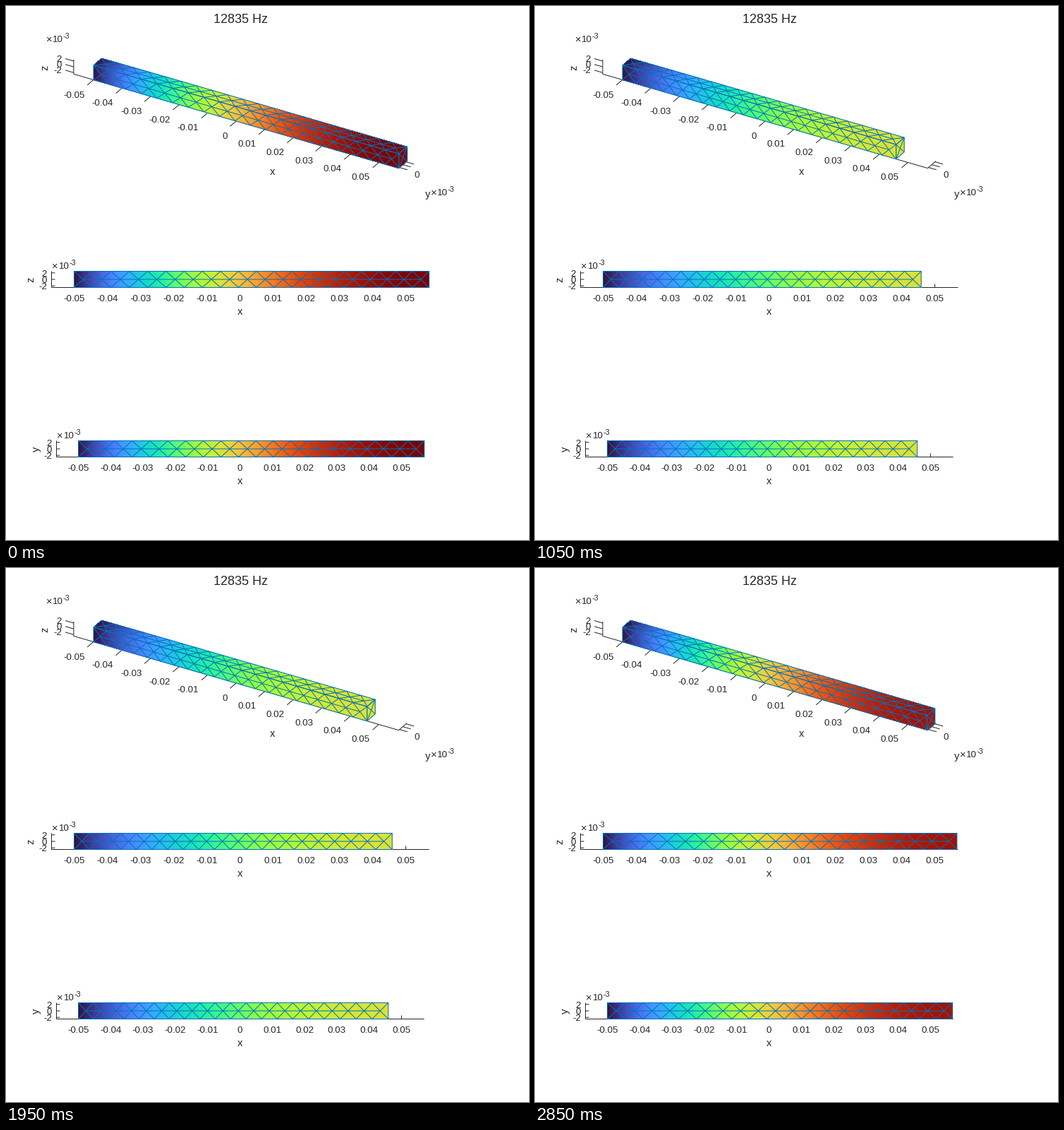
Write a matplotlib script that moves like this. It is 741 px wide and 756 px high and loops after 3 s.

```python
import numpy as np
import matplotlib.pyplot as plt
from matplotlib.animation import FuncAnimation
from matplotlib.collections import LineCollection, PolyCollection

W, H, DPI = 741, 756, 100
FRAMES, INTERVAL = 20, 150
PX = 72 / DPI                     # points per pixel
CELLS, SLICES = 20, 160
STRETCH = 0.0702                  # peak tip displacement / bar length
INK, EDGE = "#262626", "#0072BD"
TICK, LABEL, TITLE = 13.33, 14.67, 18

plt.rcParams["font.family"] = "Liberation Sans"
plt.rcParams["axes.unicode_minus"] = False

fig = plt.figure(figsize=(W / DPI, H / DPI), dpi=DPI, facecolor="white")
ax = fig.add_axes([0, 0, 1, 1])
# Whole coordinates are pixel centres, so straight lines need no snapping.
ax.set(xlim=(-0.5, W - 0.5), ylim=(H - 0.5, -0.5))
ax.axis("off")


def text(x, y, s, size=TICK, ha="center"):
    """Text whose digits are vertically centred on y."""
    ax.text(x - 0.5, y + 0.36 * size - 0.5, s, fontsize=size * PX, ha=ha,
            va="baseline", color=INK)


def side_label(x, y, s):
    ax.text(x - 0.5, y - 0.5, s, fontsize=LABEL * PX, ha="center",
            va="center", rotation=90, color=INK)


def exponent(x, y):
    text(x, y, "×", size=LABEL, ha="left")
    text(x + 9.5, y, "10", ha="left")
    text(x + 24.5, y - 4, "-3", size=10.7, ha="left")


def line(p, q):
    ax.plot([p[0], q[0]], [p[1], q[1]], color=INK, lw=PX, zorder=1,
            solid_capstyle="butt", snap=False)


def tick_name(k):
    return "0" if k == 0 else f"{k / 100:.2f}"


class Face:
    """One long side of the bar: corner, length vector and width vector."""

    def __init__(self, corner, along, across):
        self.corner, self.along, self.across = map(np.array, (corner, along, across))

    def at(self, s, v, amp):
        pos = s + amp * STRETCH * np.sin(np.pi * s / 2)
        return (self.corner + np.multiply.outer(pos, self.along)
                + np.multiply.outer(v, self.across))

    def slices(self, amp):
        s = np.linspace(0, 1, SLICES + 1)
        low, high = (self.at(s, np.full_like(s, v), amp) for v in (0, 1))
        return np.stack([low[:-1], low[1:], high[1:], high[:-1]], axis=1)

    def mesh(self, amp):
        s = np.arange(CELLS + 1) / CELLS
        mid = (s[:-1] + s[1:]) / 2
        centre = self.at(mid, np.full_like(mid, 0.5), amp)
        rails = [self.at(s, np.full_like(s, v), amp) for v in (0, 1)]
        paths = [centre, *rails]
        for rail in rails:
            zigzag = np.empty((2 * CELLS + 1, 2))
            zigzag[::2], zigzag[1::2] = rail, centre
            paths.append(zigzag)
        paths += [np.array([rails[0][i], rails[1][i]]) for i in (0, -1)]
        return paths


# Perspective view
X3, Y3, Z3 = np.array([404.3, 117.0]), np.array([11.5, -10.0]), np.array([0, -20.5])
BASE = np.array([123.5, 104.0])
axis_start, axis_end = BASE - 0.0695 * X3, BASE + 1.0695 * X3
line(axis_start, axis_end)
line(axis_start, axis_start + Z3)
line(axis_end, axis_end + Y3)
for k in range(11):
    p = BASE + X3 * k / 10
    line(p, p + (-8.8, 7.4))
    text(111.5 + 40.45 * k, 124.8 + 11.65 * k, tick_name(k - 5), ha="right")
for v, name, y in ((0.1, "-2", 90), (0.5, "0", 82), (0.9, "2", 74)):
    p, q = axis_start + v * Z3, axis_end + v * Y3
    line(p, p - (11.8, 3.4))
    line(q, q + (11.3, 3.2))
    text(79, y, name, ha="right")
text(582, 238, "0")
text(377.5, 234, "x", LABEL)
text(597.5, 265.5, "y", LABEL)
side_label(55, 87, "z")
exponent(56.5, 46.5)
exponent(601.5, 263.5)
text(332, 18, "12835 Hz", TITLE)


def flat_view(left, right, start, end, floor, height, name):
    """Axes of a side view; returns the face that lies in it."""
    step, mid = (right - left) / 10, floor - height / 2
    line((start, floor), (end, floor))
    line((start, floor), (start, floor - height))
    for k in range(11):
        x = left + step * k
        line((x, floor), (x, floor - 5))
        text(x + 0.5, floor + 15, tick_name(k - 5))
    for k in (-2, 0, 2):
        y = mid - k * height / 5
        line((start, y), (start + 5, y))
        text(start - 6, y + 0.5, str(k), ha="right")
    text((left + right) / 2 + 1, floor + 34, "x", LABEL)
    side_label(start - 28.5, mid + 0.5, name)
    exponent(start + 1, floor - height - 8)
    return Face((left, floor), (right - left, 0), (0, -height))


faces = [
    Face(BASE, X3, Z3),
    Face(BASE + Z3, X3, Y3),
    flat_view(96, 566, 64, 599, 398, 23, "z"),
    flat_view(102, 560, 71, 592, 638, 23, "y"),
]

fill = PolyCollection([], antialiaseds=False, linewidths=0, zorder=2)
edges = LineCollection([], colors=EDGE, linewidths=PX, zorder=3)
for part in (fill, edges):
    part.set_snap(False)
    ax.add_collection(part, autolim=False)

s_mid = (np.arange(SLICES) + 0.5) / SLICES
shape = np.append(np.tile(np.sin(np.pi * s_mid / 2), len(faces)), 1.0)


def update(i):
    amp = np.cos(2 * np.pi * i / FRAMES)
    tip = BASE + X3 * (1 + amp * STRETCH)
    cap = np.array([tip, tip + Y3, tip + Y3 + Z3, tip + Z3])
    quads = np.concatenate([f.slices(amp) for f in faces] + [cap[None]])
    fill.set_verts(quads)
    fill.set_facecolor(plt.cm.turbo(abs(amp) * shape))
    lines = [path for f in faces for path in f.mesh(amp)]
    lines += [cap[[0, 1, 2, 3, 0]], cap[[0, 2]], cap[[1, 3]]]
    edges.set_segments(lines)
    return fill, edges


anim = FuncAnimation(fig, update, frames=FRAMES, interval=INTERVAL,
                     repeat=True, repeat_delay=0, blit=False)
plt.show()
```
